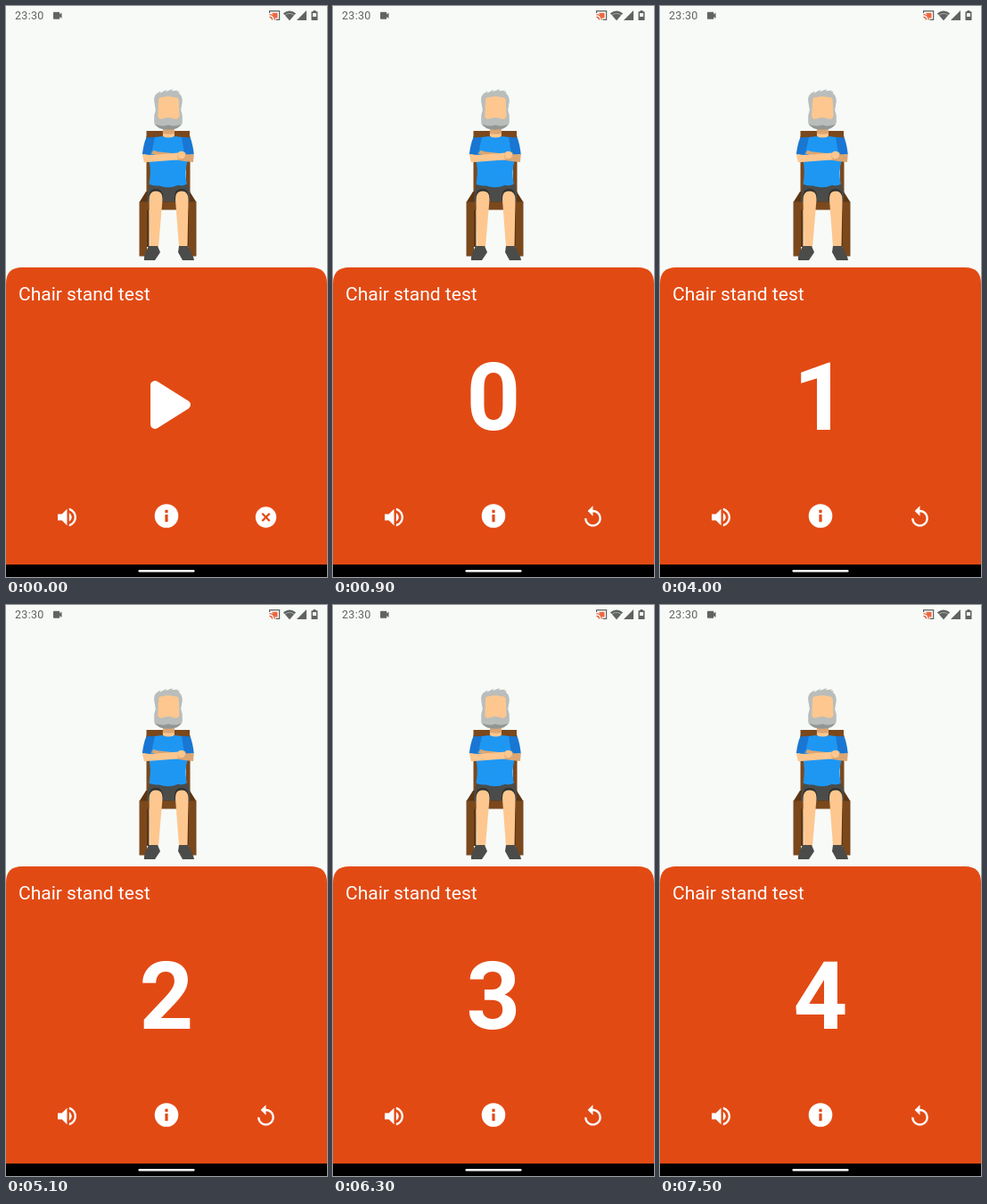
These frames come from a looping animation (360 by 640 pixels, 8 s). An HTML page:

```html
<!DOCTYPE html>
<html lang="en">
<head>
<meta charset="utf-8">
<title>Chair stand test</title>
<style>
  html, body { margin: 0; width: 100%; height: 100%; overflow: hidden; background: #f7faf7; }
  svg { display: block; width: 360px; height: 640px; font-family: Roboto, sans-serif; }
  .skin { fill: #fdc78f; }
  .tan { fill: #dca673; }
  .dark { fill: #4b4c49; }
  .wood { fill: #7b481c; }
  .shade { fill: #5d3511; }
</style>
</head>
<body>
<svg viewBox="0 0 360 640">
  <defs>
    <g id="upper">
      <path class="skin" d="M173 80h16v16q-8 7-16 0z"/>
      <path class="tan" d="M173 80h16v12q-8 2-16 0z"/>
      <path fill="#b9bdbb" d="M161 46Q160 39 164 35L170 31 169 34 178 29 177 32 187 28 185 31 195 30 192 32 196 32 195 34Q200 37 200 46L198 58 200 66V76Q199 82 190 84 180 88 171 84 161 82 161 76V66L163 58Z"/>
      <path fill="#929693" d="M163 79Q172 83 180.500 79.500 189 83 198 79 195 86.500 180.500 86.500 166 86.500 163 79Z"/>
      <path class="skin" d="M167 43Q168 39 173 40 181 37 188 40 194 39 195 44L196 66Q195 72 189 71 181 67 172 71 166 72 166 66Z"/>
      <path fill="#1e97f3" d="M172 96Q181 100 190 96L203 98 207 132Q203 145 206 165 201 168 194 166 181 172 168 167 160 168 154 165 157 145 154 132L158 98Z"/>
      <path fill="#1976d2" d="M162 97L150 98Q146 108 144.500 122L155 123 158 116Z"/>
      <path fill="#1976d2" d="M199 97L211 98Q214.500 108 216 122L205 123 202 116Z"/>
      <path class="tan" d="M157 121L160 116 166 118 192 121 203 122 216 122 215 133 203 132 180 128Z"/>
      <path class="skin" d="M144.500 122L157 123 191 120 204 119 205 126 192 130 147 133.500Z"/>
      <circle class="tan" cx="199" cy="124" r="6.200"/>
      <circle class="skin" cx="198.500" cy="122.800" r="5.400"/>
    </g>
    <g id="shoes" class="dark">
      <path d="M160 269h10l3 7-6 9h-12q-1-5 5-16z"/>
      <path d="M194 269h10q6 10 7 16h-13l-5-9z"/>
    </g>
    <g id="chair">
      <path class="wood" d="M157.500 140h48.500v8h-48.500z"/>
      <path class="wood" d="M157.500 146h4.500v66h-4.500zM202 146h4.500v66h-4.500z"/>
      <path class="shade" d="M156 227h4.500v43h-4.500zM203 227h4v43h-4z"/>
      <path class="shade" d="M157 208h49l7.500 12h-64z"/>
      <path class="wood" d="M149.500 219.500h64v61h-8.500v-52h-47v52h-8.500z"/>
    </g>
  </defs>

  <rect width="360" height="640" fill="#f7faf7"/>

  <g fill="#5f6361">
    <text x="10" y="15" font-size="12.500" letter-spacing=".3">23:30</text>
    <path d="M53 7.500q0-.8.800-.8h5.700q.8 0 .8.800v2l2.200-2v6.500l-2.200-2v2q0 .8-.8.800h-5.700q-.8 0-.8-.8z"/>
    <path d="M311 8.200q7-5.500 14 0l-7 8z" opacity=".45"/>
    <path d="M313 10.500q5-3.500 10 0l-5 5.700z"/>
    <path d="M311 8.200q7-5.500 14 0l-1.500 1.700q-5.500-4-11 0z"/>
    <path d="M337 5v11h-11z"/>
    <path d="M344.500 5h3v1.200h2v9.800h-7v-9.800h2z"/>
    <path d="M344 8h4v4h-4z" fill="#f7faf7"/>
  </g>
  <g fill="none" stroke="#5f6361" stroke-width="1.200">
    <path d="M295.600 8v-2.400h11v9.800h-4"/>
    <path d="M298 7.800h6.500v5.600h-2.500" fill="#f0643c" stroke="none"/>
    <path d="M295.500 9.700q5.500 0 5.700 5.700M295.500 12.300q3 0 3.100 3.100" stroke="#e2552e"/>
  </g>

  <use href="#chair"/>
  <g id="sit">
    <path class="dark" d="M161 200h43q3 8 2 20l-8 2q-16-6-32 0l-8-2q0-12 3-20z"/>
    <path d="M160 219q-1-14 8-14 9 0 8 13zM189 218q-1-13 8-13 9 0 7 14z" fill="#30312f"/>
    <path class="skin" d="M160.500 217q0-9.500 7.500-9.500 8 0 7.500 9.500L171 270h-9.500zM190 217q-.5-9.500 7-9.500 7.500 0 7.500 9.500L203.500 270h-9.500z"/>
    <use href="#shoes"/>
    <use href="#upper" transform="translate(35.800 71.160) scale(.81 .78)"/>
  </g>
  <g id="stand">
    <path class="skin" d="M160 208h15.500L171 271h-10zM189.500 208h15.500L203.500 271h-9.500z"/>
    <path class="tan" d="M160 208h15.500l-.5 6q-8 2-15 0zM189.500 208h15.500v6q-7 2-15 0z"/>
    <path class="dark" d="M156 162h49.500l1.500 47q-10 3-20 2l-5.500-5-5.500 5q-11 1-21.500-2z"/>
    <use href="#shoes" y="1"/>
    <use href="#upper"/>
  </g>

  <path d="M0 640V311q0-18 18-18h324q18 0 18 18v329z" fill="#e24a14"/>
  <g fill="#fff">
    <text x="14" y="330" font-size="21">Chair stand test</text>
    <path id="volume" transform="translate(54.500 559) scale(1.165)" d="M3 9v6h4l5 5V4L7 9H3zm13.500 3c0-1.770-1.020-3.290-2.500-4.030v8.050c1.480-.73 2.500-2.250 2.500-4.020zM14 3.230v2.060c2.890.86 5 3.540 5 6.710s-2.110 5.850-5 6.710v2.060c4.010-.91 7-4.490 7-8.770s-2.990-7.860-7-8.770z"/>
    <circle cx="180" cy="571.500" r="13.300"/>
    <path d="M178.400 570h3.200v8.200h-3.200zM178.400 564.800h3.200v3.200h-3.200z" fill="#e24a14"/>
    <g id="ready">
      <path d="M167 425v44l35-22z" stroke="#fff" stroke-width="10" stroke-linejoin="round"/>
      <circle cx="291.500" cy="573" r="11.700"/>
      <path d="M287.300 568.800l8.400 8.400m0-8.400l-8.400 8.400" stroke="#e24a14" stroke-width="2.300"/>
    </g>
    <g id="running">
      <text id="count" x="180" y="474.500" font-size="106" font-weight="700" text-anchor="middle">0</text>
      <path transform="translate(277.500 559) scale(1.165)" d="M12 5V1L7 6l5 5V7c3.310 0 6 2.690 6 6s-2.690 6-6 6-6-2.690-6-6H4c0 4.420 3.580 8 8 8s8-3.580 8-8-3.580-8-8-8z"/>
    </g>
  </g>
  <rect y="626" width="360" height="14"/>
  <rect x="148.500" y="632" width="63" height="2.600" rx="1.300" fill="#fff"/>
</svg>
<script>
  const LOOP = 8000;
  const moves = [2400, 4000, 4400, 5100, 5700, 6300, 6900, 7500]; // alternately up and down
  const el = id => document.getElementById(id);
  const show = (id, alpha) => el(id).setAttribute('opacity', alpha);

  function draw(now) {
    const t = now % LOOP;
    const done = moves.filter(m => m <= t).length;
    const up = done % 2;
    const started = Math.min(Math.floor(t / 100) / 4, 1);
    show('sit', 1 - up);
    show('stand', up);
    show('ready', 1 - started);
    show('running', started);
    el('count').textContent = Math.floor(done / 2);
    requestAnimationFrame(draw);
  }
  draw(0);
</script>
</body>
</html>
```
